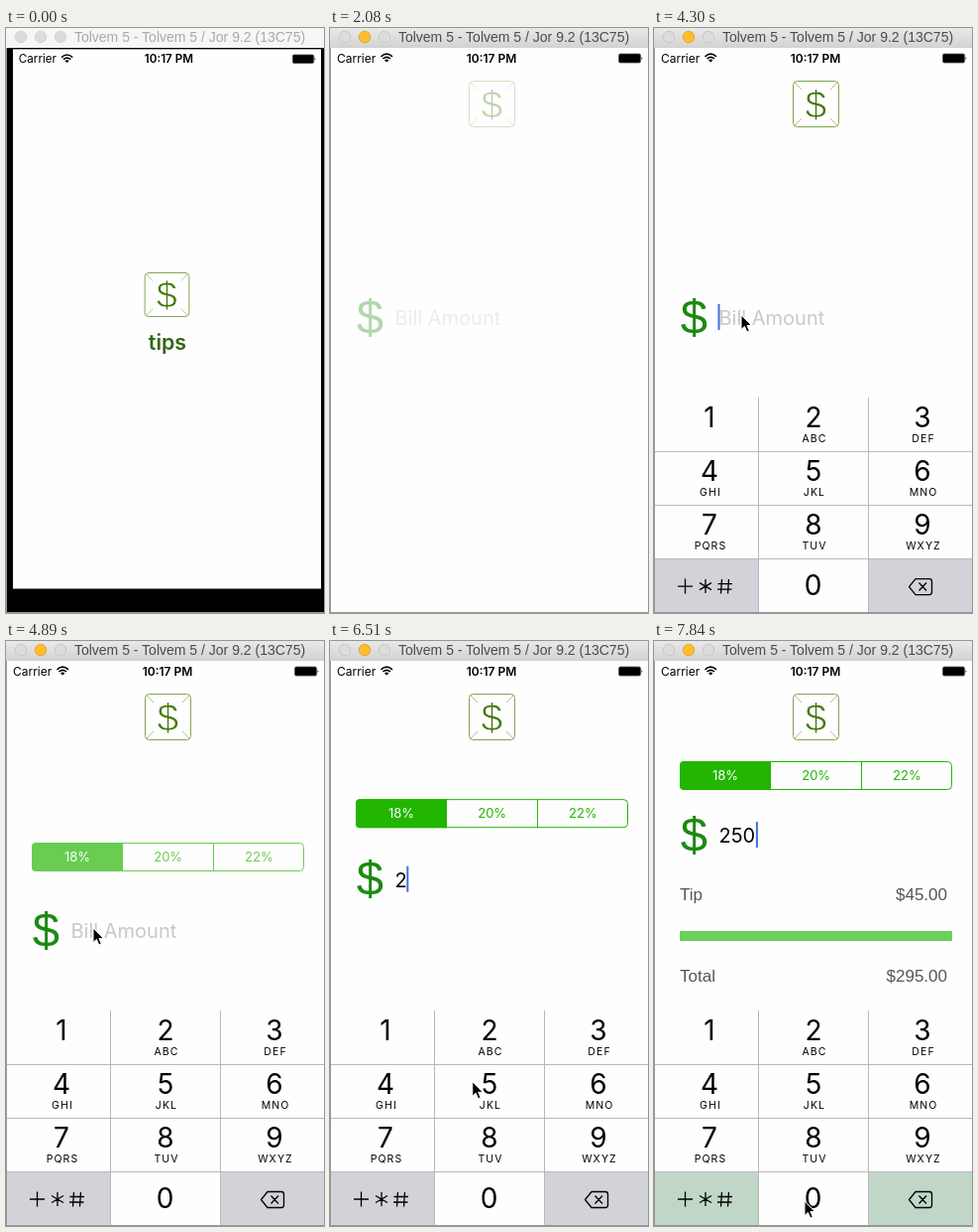
Animation of 321 by 589 pixels, one loop 7990 ms. Source, as an HTML page:

```html
<!DOCTYPE html>
<html lang="en">
<head>
<meta charset="utf-8">
<title>tips</title>
<style>
  html, body { margin: 0; width: 100%; height: 100%; overflow: hidden; background: #fff; }
  svg { display: block; width: 321px; height: 589px; }
  text { font-family: Inter, Roboto, sans-serif; }
  .mid { text-anchor: middle; }
  .end { text-anchor: end; }
  .helv { font-family: "Liberation Sans", Arial, sans-serif; }
  .row { font-size: 17px; fill: #555; }
  .digit { font-size: 28px; }
  .letters { font-size: 10.5px; letter-spacing: 1.1px; }
  .line { fill: none; stroke: #000; stroke-width: 1.3; }
</style>
</head>
<body>
<svg viewBox="0 0 321 589">
  <defs>
    <linearGradient id="chrome" x2="0" y2="1">
      <stop stop-color="#e9e9e9"/><stop offset="1" stop-color="#d2d2d2"/>
    </linearGradient>
    <clipPath id="glass"><path d="M1 20H321V588H1Z"/></clipPath>
    <g id="bill">
      <rect x=".5" y=".5" width="46" height="46" rx="4" fill="none" stroke="#83a351"/>
      <path d="M2 2L9 9M45 2L38 9M2 45L9 38M45 45L38 38" stroke="#b3c3a0"/>
      <text class="mid helv" x="23.3" y="38" font-size="39" fill="#437806" stroke="#fefefe" stroke-width=".8">$</text>
    </g>
  </defs>

  <rect width="321" height="589" fill="#9a9a9a"/>
  <rect id="bar" width="321" height="20"/>
  <g id="lights" stroke-width=".8">
    <circle cx="15" cy="9" r="5.8"/><circle id="yellow" cx="35" cy="9" r="5.8"/><circle cx="55" cy="9" r="5.8"/>
  </g>
  <text id="title" class="mid helv" x="185.5" y="14" font-size="14">Tolvem 5 - Tolvem 5 / Jor 9.2 (13C75)</text>

  <rect x="1" y="20" width="320" height="568"/>
  <g id="screen" clip-path="url(#glass)">
    <rect x="1" y="20" width="320" height="568" fill="#fefefe"/>
    <text x="7" y="34.5" font-size="12">Carrier</text>
    <g fill="none" stroke="#000" stroke-width="1.6">
      <path d="M51.5 28.8Q57.2 23.6 63 28.8M53.5 31Q57.2 27.8 61 31"/>
      <path d="M57.2 34.6L55 32.4Q57.2 30.8 59.4 32.4Z" fill="#000" stroke="none"/>
    </g>
    <text class="mid" x="163" y="34.5" font-size="12" font-weight="600">10:17 PM</text>
    <rect x="291.5" y="26" width="22" height="9" rx="1.5" stroke="#555" stroke-width=".8"/>
    <path d="M314.5 28.8Q316.2 30.5 314.5 32.2Z"/>

    <g id="splash">
      <use href="#bill" x="137.5" y="255"/>
      <text class="mid" x="161.5" y="337" font-size="22" font-weight="600" fill="#2f6610">tips</text>
    </g>

    <g id="home">
      <use href="#bill" x="140" y="53"/>
      <g id="field">
        <text class="mid helv" x="40.5" y="307.5" font-size="49" fill="#1c8a12">$</text>
        <text id="amount" x="65.5" y="299" font-size="20"></text>
        <rect id="caret" y="278" width="2" height="26" fill="#416fdf"/>
      </g>
    </g>

    <g id="rates" fill="#22b600"></g>

    <g id="totals">
      <text class="helv row" x="26" y="261">Tip</text>
      <text class="helv row end" id="tip" x="296" y="261"></text>
      <rect x="26" y="292" width="275" height="10" fill="#6bcf5b"/>
      <text class="helv row" x="26" y="343">Total</text>
      <text class="helv row end" id="total" x="296" y="343"></text>
    </g>

    <g id="keyboard">
      <rect x="1" y="372" width="320" height="217" fill="#fefefe"/>
      <path id="sideKeys" d="M1 535H105V589H1ZM217 535H321V589H217Z"/>
      <rect id="pressed" x="106" width="110" height="54" fill="#d1d3d9"/>
      <path d="M105.5 372V589M216.5 372V589M1 426.5H321M1 480.5H321M1 534.5H321" stroke="#b8b8bc"/>
      <g id="keys"></g>
      <path class="line" d="M24 562H39M31.5 554.5V569.5M52 555V569M46 558.5L58 565.5M58 558.5L46 565.5M68.5 555L67.5 569.5M75.5 555L74.5 569.5M64.5 559.5H79M64 565H78.5"/>
      <path class="line" d="M264 554.5H278Q280.5 554.5 280.5 557V568Q280.5 570.5 278 570.5H264L257.5 562.5ZM267.5 558.5L275 566.5M275 558.5L267.5 566.5" stroke-linejoin="round"/>
    </g>
  </g>
  <path id="pointer" d="M0 0V14.5L3.4 11.4L5.8 17L8.3 16L5.9 10.5H10.5Z" stroke="#fff"/>
</svg>

<script>
const LOOP = 7990, STEP = 148;
const el = id => document.getElementById(id);
const attrs = (id, values) => {
  for (const name in values) el(id).setAttribute(name, values[name]);
};
const clamp = v => Math.min(1, Math.max(0, v));
const mix = (a, b, p) => a + (b - a) * p;
const linear = (t, start, length) => clamp((t - start) / length);
const ease = (t, start, length) => (1 - Math.cos(Math.PI * linear(t, start, length))) / 2;
const money = v => '$' + v.toFixed(2);

// Typed digits: when the key goes down, the amount it leaves, the top of the key
const typed = [
  { at: 5772, amount: '2', top: 372 },
  { at: 6660, amount: '25', top: 427 },
  { at: 7548, amount: '250', top: 535 }
];

const pointerPath = [
  [2072, -14, 400], [2368, 15, 345], [2900, 88, 289], [5100, 88, 289], [5720, 159, 377],
  [6200, 159, 377], [6620, 141, 456], [6956, 141, 456], [7390, 152, 564], [LOOP, 152, 564]
];

function pointerAt(t) {
  const next = pointerPath.findIndex(point => point[0] > t);
  if (next < 1) return pointerPath[0].slice(1);
  const [t0, x0, y0] = pointerPath[next - 1], [t1, x1, y1] = pointerPath[next];
  const p = ease(t, t0, t1 - t0);
  return [mix(x0, x1, p), mix(y0, y1, p)];
}

function buildKeys() {
  const letters = ['', 'ABC', 'DEF', 'GHI', 'JKL', 'MNO', 'PQRS', 'TUV', 'WXYZ'];
  const columns = [56, 161, 271];
  el('keys').innerHTML = letters.map((text, i) => {
    const x = columns[i % 3], y = 402 + 54 * Math.floor(i / 3);
    return `<text class="mid digit" x="${x}" y="${y}">${i + 1}</text>
      <text class="mid letters" x="${x + 1}" y="${y + 15}">${text}</text>`;
  }).join('') + '<text class="mid digit" x="160.5" y="571">0</text>';
}

function buildRates() {
  el('rates').innerHTML = `
    <path d="M118 203H30Q26 203 26 207V228Q26 232 30 232H118Z"/>
    <rect x="26.5" y="203.5" width="274" height="28" rx="4" fill="none" stroke="#22b600"/>
    <path d="M209.5 203V232" stroke="#22b600"/>` +
    ['18%', '20%', '22%'].map((rate, i) =>
      `<text class="mid" x="${72 + 91.7 * i}" y="222" font-size="13"${i ? '' : ' fill="#fff"'}>${rate}</text>`).join('');
}

function drawWindow(t) {
  const active = t >= 1900;
  const zoom = t < 140 ? 0 : t < 290 ? 0.7 : 1;
  attrs('bar', { fill: active ? 'url(#chrome)' : '#f6f6f6' });
  attrs('title', { fill: active ? '#4c4c4c' : '#a9a9a9' });
  attrs('lights', { fill: '#dcdcdc', stroke: active ? '#c3c3c3' : '#d2d2d2' });
  attrs('yellow', { fill: active ? '#fdbd2e' : '#dcdcdc', stroke: active ? '#dfa023' : '#d2d2d2' });
  attrs('screen', {
    transform: `matrix(${mix(.972, 1, zoom)} 0 0 ${mix(.957, 1, zoom)} ${mix(6, 0, zoom)} ${mix(2, 0, zoom)})`
  });
}

function drawForm(t) {
  const lift = ease(t, 5990, 1000), reveal = ease(t, 6580, 960);
  const amount = typed.filter(key => t >= key.at + 100).map(key => key.amount).pop() || '';
  const bill = Number(amount), tip = bill * 0.18;

  attrs('splash', { opacity: 1 - linear(t, 1190, 395) });
  attrs('home', { opacity: ease(t, 1600, 1200) });
  attrs('field', { transform: `translate(0 ${-96 * lift})` });
  attrs('rates', { opacity: ease(t, 4267, 1000), transform: `translate(0 ${-82 * lift})` });
  attrs('amount', { fill: amount ? '#000' : '#c8c8cd' });
  el('amount').textContent = amount || 'Bill Amount';

  const blinkOn = t >= 3990 && (amount || (t - 3990) % 1060 < 560);
  attrs('caret', { x: 64.5 + 12.8 * amount.length, opacity: blinkOn ? 1 : 0 });

  attrs('totals', { opacity: reveal });
  el('tip').textContent = money(tip);
  el('total').textContent = money(bill + tip);
  return reveal;
}

function drawKeyboard(t, reveal) {
  const rise = 1 - (1 - linear(t, 3900, 420)) ** 3;
  const held = typed.find(key => t >= key.at - 5 && t < key.at + 100);
  const tint = [[209, 192], [211, 215], [217, 200]].map(([a, b]) => Math.round(mix(a, b, reveal)));
  attrs('keyboard', { transform: `translate(0 ${217 * (1 - rise)})` });
  attrs('sideKeys', { fill: `rgb(${tint})` });
  attrs('pressed', { y: held ? held.top : 0, opacity: held ? 1 : 0 });
}

function draw(elapsed) {
  const t = Math.floor((elapsed % LOOP) / STEP + 0.12) * STEP;
  drawWindow(t);
  drawKeyboard(t, drawForm(t));
  attrs('pointer', { transform: `translate(${pointerAt(t)})` });
}

let start;
function tick(now) {
  start ??= now;
  draw(now - start);
  requestAnimationFrame(tick);
}

buildKeys();
buildRates();
draw(0);
requestAnimationFrame(tick);
</script>
</body>
</html>
```
